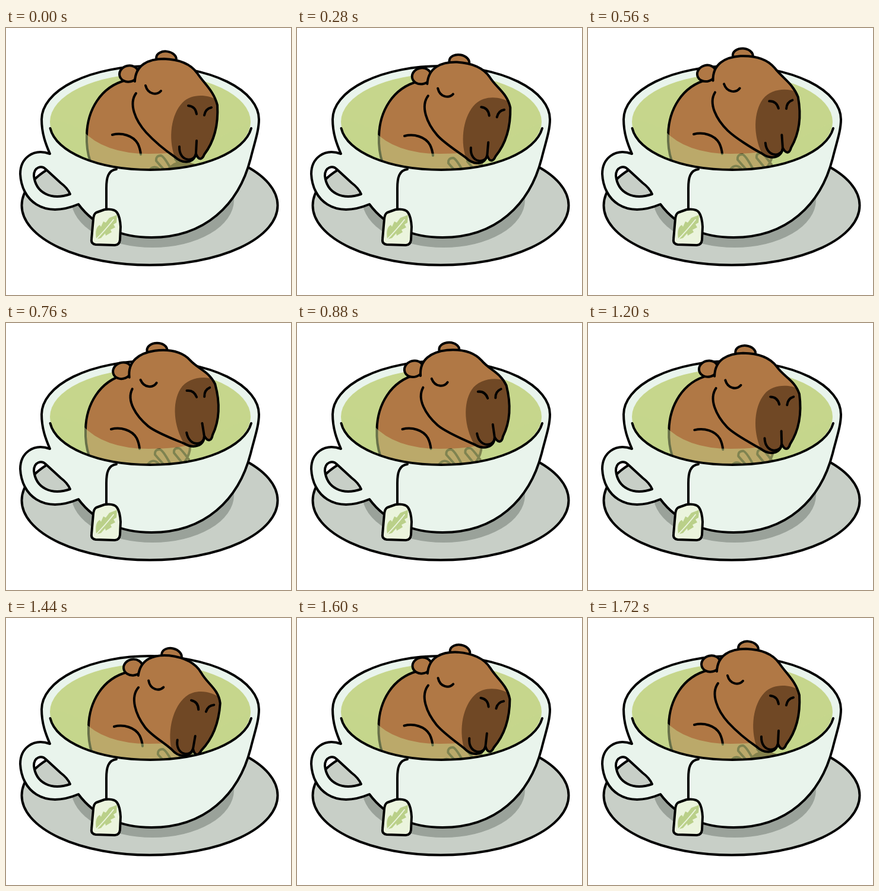
An HTML page with a canvas for the animation above (2240 ms loop, 480 px wide and 450 px high).

```html
<!DOCTYPE html>
<html lang="en">
<head>
<meta charset="utf-8">
<title>Capybara in a teacup</title>
<style>
html, body { margin: 0; height: 100%; overflow: hidden; background: #fff; }
canvas { display: block; }
</style>
</head>
<body>
<canvas id="stage" width="480" height="450"></canvas>
<script>
const ctx = document.getElementById('stage').getContext('2d');
const MINT = '#e9f4ec', TEA = '#c6d68c', BROWN = '#b07845', INK = '#000';
const LOOP = 2240;

// Per pose: body shift, head shift and turn, snout shift and turn
const poses = [
  [0, 0, 0, 0, 0, 0, 0, 0],
  [2, 2, 2, 5, 1.5, 3, 3, 2],
  [-1, -1, -5.5, -3.5, -4, -1, -10, -7],
  [-2, -1, -7.5, -3, -8.6, -1.5, -21, -12],
  [-1, -1, -7.5, -6, -4.5, -1, -17, -10],
  [3, 3, 4.5, 9.5, 5, 4, 10, 7]
];

// Start time and position along the cycle of poses
const steps = [
  [0, 0], [160, .5], [280, 1], [560, 2], [640, 2.5], [760, 3], [880, 3.5],
  [1080, 4], [1200, 4.33], [1320, 4.67], [1440, 5], [1600, 5.5], [1720, 6]
];

function draw(d, fill, stroke, width = 4, rule = 'nonzero') {
  const p = new Path2D(d);
  if (fill) { ctx.fillStyle = fill; ctx.fill(p, rule); }
  if (stroke) { ctx.strokeStyle = stroke; ctx.lineWidth = width; ctx.stroke(p); }
}

function oval(x, y, rx, ry, fill, stroke, turn = 0) {
  ctx.beginPath();
  ctx.ellipse(x, y, rx, ry, turn * Math.PI / 180, 0, 7);
  ctx.fillStyle = fill;
  ctx.fill();
  if (stroke) { ctx.strokeStyle = stroke; ctx.lineWidth = 4; ctx.stroke(); }
}

// Returns a function that turns a point about (px, py) and shifts it
function mover(px, py, dx, dy, deg) {
  const a = deg * Math.PI / 180, c = Math.cos(a), s = Math.sin(a);
  return (x, y) => [
    px + dx + (x - px) * c - (y - py) * s,
    py + dy + (x - px) * s + (y - py) * c
  ];
}

function cup() {
  oval(242, 299, 215.5, 100.5, '#c8cfc7', INK);
  oval(247, 290, 137, 80, '#9aa29a');
  draw(`M426,154 A183 90 0 0 0 60 154 C60,178 67,196 74,212
    C45,202 24,220 24,246 C26,290 62,322 122,297
    C150,335 195,353 245,353 C335,353 392,298 412,220 C418,195 426,174 426,154 Z
    M67,238 C60,231 47,234 47,249 C50,278 76,291 108,280 Q104,270 92,261 Z`,
    MINT, INK, 4, 'evenodd');
  oval(243, 158, 169, 81, TEA);
}

function body(x, y) {
  ctx.save();
  ctx.translate(x, y);
  draw('M202,88 C159,99 137,139 136,180 Q135,205 142,225 L150,250 L300,240 Q313,224 312,207 L300,140 L225,90 Z', BROWN);
  draw('M202,88 C159,99 137,139 136,180 Q135,205 142,225', null, INK);
  draw('M179,180 C195,176 214,181 222,195 Q226,203 227,213', null, INK);
  ctx.translate(0, y);
  draw(`M241,240 Q250,229 260,240 M268,241 L253,224 Q252,215 261,215 Q266,216 278,238
    M299,238 L285,221 Q284,212 293,213 Q296,213 310,232 M312,207 Q313,222 303,236`, null, '#33270f');
  ctx.restore();
}

function water() {
  ctx.globalAlpha = .52;
  draw('M74,158 Q88,150 128,172 Q165,212 240,212 Q290,212 320,203 L412,158 A169 81 0 0 1 74 158 Z', TEA);
  ctx.globalAlpha = 1;
}

function head(H, S, turn) {
  oval(...H(207, 77), 16, 13.5, BROWN, INK, turn - 12);
  oval(...H(270, 51.5), 17, 12, BROWN, INK, turn + 8);
  const chin = `C${S(330, 223)} ${S(324, 223)} ${S(320, 212)} C${S(316, 228)} ${S(298, 230)} ${S(284, 217)}`;
  const shape = `M${H(217, 90)} C${H(218, 62)} ${H(240, 52)} ${H(266, 52)}
    C${H(296, 53)} ${H(312, 62)} ${H(322, 76)} C${H(334, 94)} ${S(350, 106)} ${S(356, 130)}
    C${S(358, 165)} ${S(350, 192)} ${S(334, 213)} ${chin}
    C${S(268, 206)} ${H(248, 189)} ${H(236, 176)} C${H(218, 156)} ${H(206, 128)} ${H(219, 110)}`;
  draw(shape, BROWN);
  draw(`M${S(284, 217)} C${S(273, 185)} ${S(278, 146)} ${S(297, 126)}
    C${S(312, 110)} ${S(340, 112)} ${S(354, 121)} L${S(356, 130)}
    C${S(358, 165)} ${S(350, 192)} ${S(334, 213)} ${chin}`, '#704825');
  draw(shape, null, INK);
  draw(`M${S(292, 200)} C${S(291, 227)} ${S(320, 227)} ${S(320, 210)} L${S(321, 190)}
    M${S(307, 131)} Q${S(319, 132)} ${S(321, 145)} M${S(334, 147)} Q${S(336, 136)} ${S(346, 134)}
    M${H(235, 97)} C${H(239, 112)} ${H(254, 114)} ${H(261, 106)}`, null, INK);
}

function front() {
  draw('M74.5,169 C84,209 154,239 243,239 C332,239 402,209 413,169', null, INK);
  draw('M186,238 C172,240 169,252 169,270 V306', null, INK);
  draw(`M152,311 L166,306 Q182,304 187,311 Q192,318 193,335 L192,357 Q191,366 183,366
    L151,365 Q143,364 144,356 L147,322 Q148,313 152,311 Z`, '#ebf4dd', INK);
  draw(`M152,356 C150,342 152,335 158,332 L160,335 L164,326 L168,328 L174,320 L187,315
    L186,328 L181,331 L184,336 L176,340 L178,344 L168,350 L167,346 L160,354 Z`, '#bad089');
  draw('M151,357 Q165,343 181,323', null, '#ebf4dd', 2);
}

function frame(now) {
  const t = now % LOOP;
  const at = steps.findLast(s => s[0] <= t)[1];
  const i = Math.floor(at), k = at - i;
  const next = poses[(i + 1) % 6];
  const p = poses[i % 6].map((v, n) => v + (next[n] - v) * k);

  ctx.clearRect(0, 0, 480, 450);
  ctx.lineCap = ctx.lineJoin = 'round';
  cup();
  ctx.save();
  ctx.clip(new Path2D('M0,0 H480 V158 H412 A169 81 0 0 1 74 158 H0 Z'));
  body(p[0], p[1]);
  water();
  if (at % 6 === 0) draw('M268,241 Q284,222 300,224 L318,229 L300,240 Z', '#85824c');
  head(mover(247, 104, p[2], p[3], p[4]), mover(326, 138, p[5], p[6], p[7]), p[4]);
  ctx.restore();
  front();
  requestAnimationFrame(() => frame(performance.now() - start));
}

const start = performance.now();
frame(0);
</script>
</body>
</html>
```
